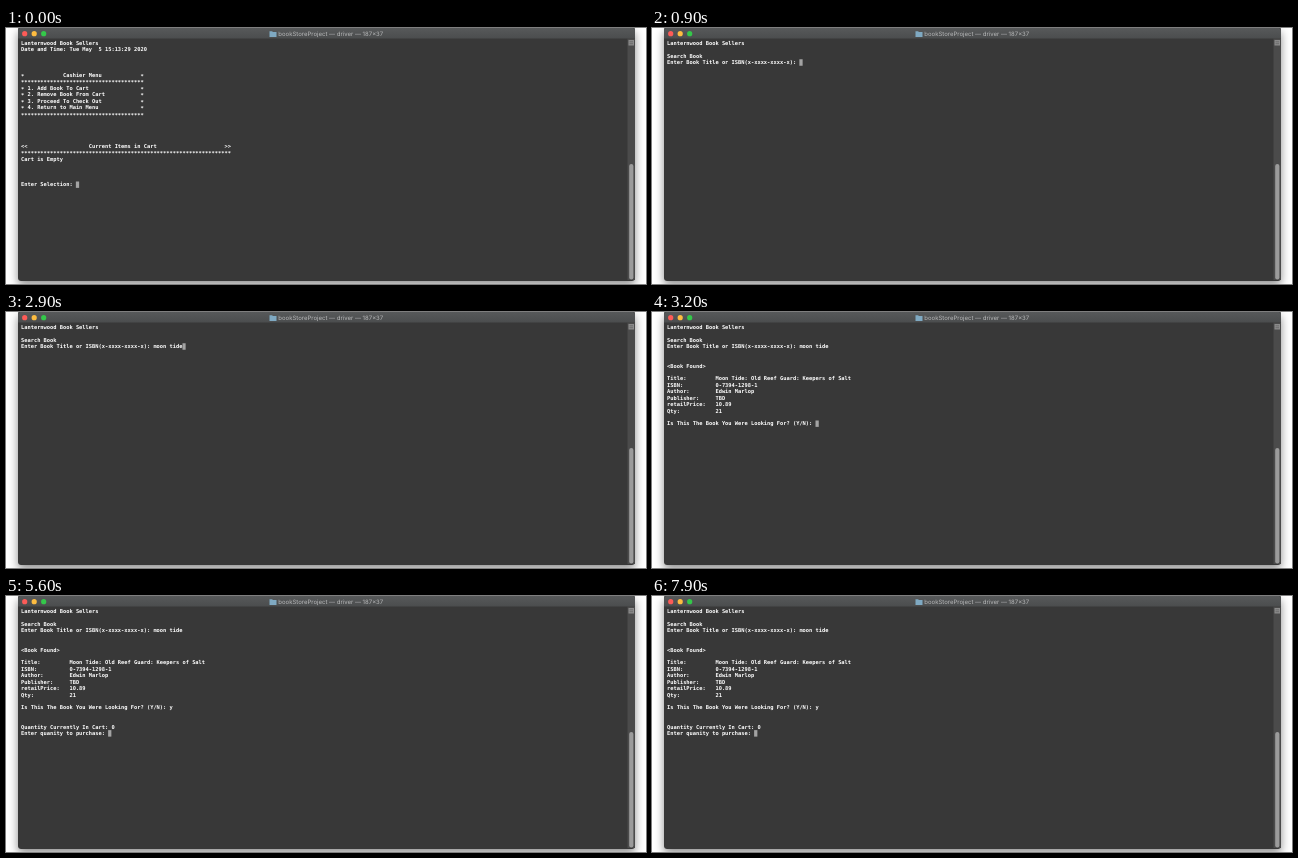
An HTML page for the animation above (8 s loop, 640x256 px).

```html
<!DOCTYPE html>
<html lang="en">
<head>
<meta charset="utf-8">
<title>Terminal book store</title>
<style>
html, body { margin: 0; width: 100%; height: 100%; overflow: hidden; background: #fff; }
#stage { position: relative; width: 640px; height: 256px; overflow: hidden; }
#win {
  position: absolute; left: 12px; top: -1px; width: 617px; height: 254px;
  border-radius: 3px; background: #383838; overflow: hidden;
}
#shade {
  position: absolute; left: 12px; top: 0; width: 617px; height: 253px;
  border-radius: 3px; box-shadow: 0 4px 10px rgba(0, 0, 0, .45);
}
#chrome { position: absolute; left: 0; top: 0; }
#name { font: 6px Inter, "Liberation Sans", sans-serif; fill: #b9babb; text-rendering: geometricPrecision; }
/* laid out at 8x so the small cell size stays exact */
#term {
  position: absolute; left: 14.7px; top: 12.3px; margin: 0;
  font: bold 42.92px/51.44px "DejaVu Sans Mono", monospace;
  text-rendering: geometricPrecision; font-variant-ligatures: none;
  color: #fff; white-space: pre;
  transform: scale(.125); transform-origin: 0 0;
}
#term b { position: relative; top: .17em; }
#term i { display: inline-block; width: 1ch; height: 51.44px; vertical-align: top; background: #a3a3a3; }
</style>
</head>
<body>
<div id="stage">
  <div id="shade"></div>
  <div id="win"></div>
  <svg id="chrome" width="640" height="256" viewBox="0 0 640 256">
    <defs>
      <linearGradient id="bar" x1="0" y1="0" x2="0" y2="1">
        <stop offset="0" stop-color="#57595a"/>
        <stop offset="1" stop-color="#4b4d4e"/>
      </linearGradient>
    </defs>
    <path d="M12 10.5V2.5Q12 0 14.5 0H626.5Q629 0 629 2.5V10.5Z" fill="url(#bar)"/>
    <circle cx="18.7" cy="5.7" r="2.6" fill="#fc5b57"/>
    <circle cx="28.2" cy="5.7" r="2.6" fill="#fdbc40"/>
    <circle cx="37.7" cy="5.7" r="2.6" fill="#34c84a"/>
    <path d="M263.5 3.2h2.6l.8.8h3.6v5h-7z" fill="#7fa9c2"/>
    <text id="name" x="272.3" y="8.2">bookStoreProject — driver — 187×37</text>
    <rect x="621.5" y="10.5" width="7.5" height="241.5" fill="#4b4b4b"/>
    <rect x="622.5" y="12" width="5.5" height="5.5" fill="#8b8b8b"/>
    <path d="M623.5 13.8h3.5M623.5 15.7h3.5" stroke="#5a5a5a" stroke-width=".6"/>
    <rect x="623.2" y="136" width="4.2" height="115.5" rx="2.1" fill="#9b9b9b"/>
  </svg>
  <pre id="term"></pre>
</div>
<script>
const LOOP = 8000;
const term = document.getElementById("term");
const stars = n => "*".repeat(n);
const item = s => ("* " + s).padEnd(37) + "*";
const field = (k, v) => (k + ":").padEnd(15) + v;

const shop = "Lanternwood Book Sellers";
const menu = [
  shop,
  "Date and Time: Tue May  5 15:13:29 2020",
  "", "", "",
  item("           Cashier Menu"),
  stars(38),
  item("1. Add Book To Cart"),
  item("2. Remove Book From Cart"),
  item("3. Proceed To Check Out"),
  item("4. Return to Main Menu"),
  stars(38),
  "", "", "", "",
  "<<".padEnd(21) + "Current Items in Cart".padEnd(42) + ">>",
  stars(65),
  "Cart is Empty",
  "", "", "",
  "Enter Selection: "
].join("\n");

const search = [shop, "", "Search Book", "Enter Book Title or ISBN(x-xxxx-xxxx-x): "].join("\n");
const query = "moon tide";
const found = search + [
  query, "", "",
  "<Book Found>",
  "",
  field("Title", "Moon Tide: Old Reef Guard: Keepers of Salt"),
  field("ISBN", "0-7394-1298-1"),
  field("Author", "Edwin Marlop"),
  field("Publisher", "TBD"),
  field("retailPrice", "10.89"),
  field("Qty", "21"),
  "",
  "Is This The Book You Were Looking For? (Y/N): "
].join("\n");
const buy = found + "y\n\n\nQuantity Currently In Cart: 0\nEnter quanity to purchase: ";

const keyTimes = [1600, 1700, 1900, 2100, 2400, 2500, 2600, 2700, 2900];
const steps = [
  [0, menu],
  [400, menu + "1"],
  [700, search],
  ...keyTimes.map((t, i) => [t, search + query.slice(0, i + 1)]),
  [3100, found],
  [4900, found + "y"],
  [5200, buy]
];

const markup = s => s.replace(/</g, "&lt;").replace(/\*+/g, "<b>$&</b>") + "<i></i>";

let shown = null;
function draw() {
  const t = performance.now() % LOOP;
  const text = steps.filter(s => s[0] <= t).pop()[1];
  if (text !== shown) term.innerHTML = markup(shown = text);
  requestAnimationFrame(draw);
}
draw();
</script>
</body>
</html>
```
